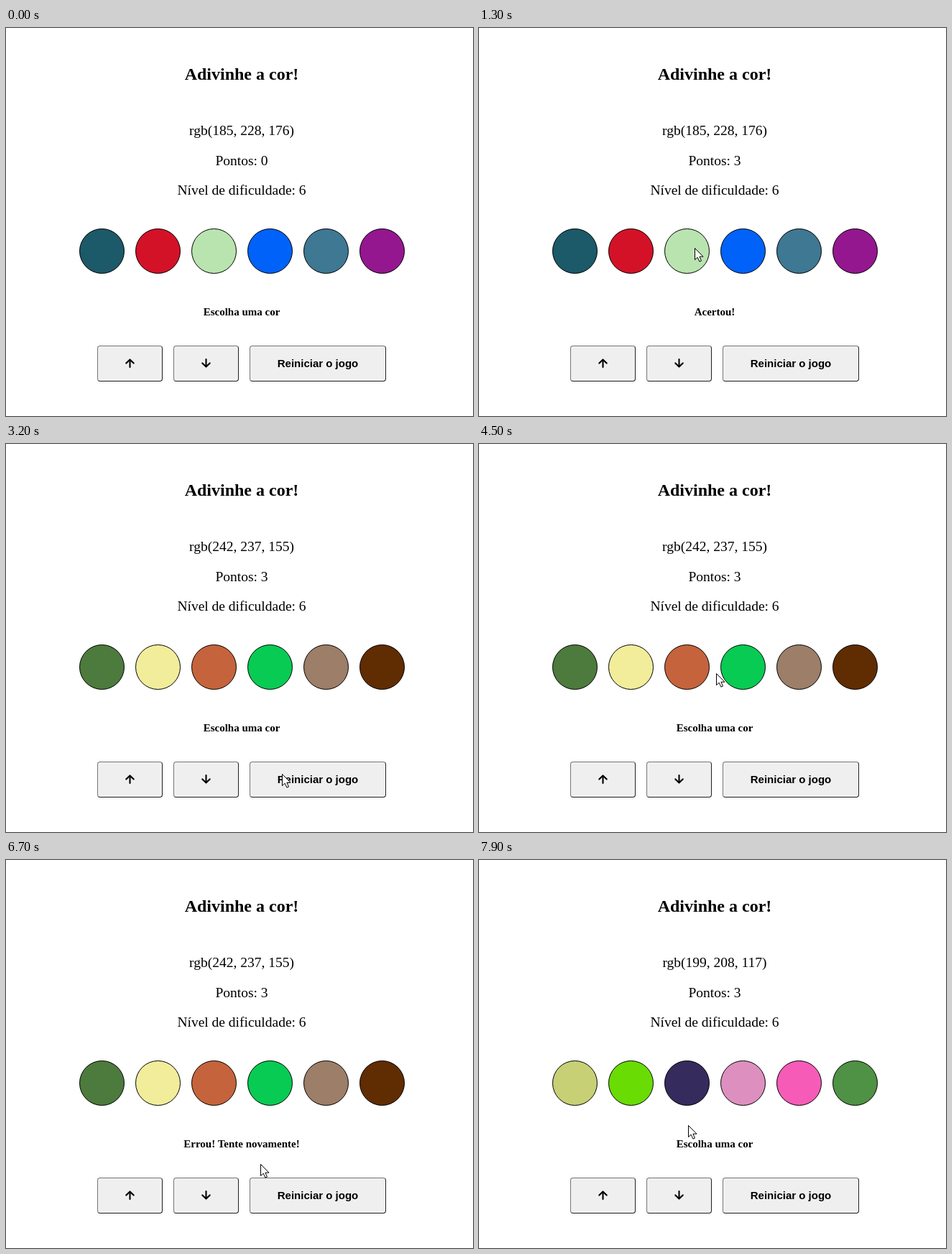
Recreate the animation shown at these times as an HTML page. Size 650x540 px, loop 8000 ms.

```html
<!DOCTYPE html>
<html lang="pt">
<head>
<meta charset="utf-8">
<title>Adivinhe a cor!</title>
<style>
html, body { margin: 0; width: 100%; height: 100%; overflow: hidden; background: #fff; }
#stage { position: relative; width: 650px; height: 540px; overflow: hidden; color: #000;
  font: 19.5px/21px "Liberation Serif", "Times New Roman", serif; }
#stage > * { position: absolute; margin: 0; box-sizing: border-box; }
p { left: 0; width: 656px; text-align: center; white-space: nowrap; }
.title { top: 51px; font-weight: bold; font-size: 24px; line-height: 26px; }
#code { top: 132px; }
#points { top: 174px; }
.level { top: 215px; }
#message { top: 387px; font-weight: bold; font-size: 15px; line-height: 16px; }
.ball { top: 279px; width: 63px; height: 63px; border: 1px solid #000; border-radius: 50%; }
.button { top: 442px; width: 91px; height: 50px; border: 1px outset #767676; border-radius: 4px;
  background: #efefef; text-align: center; font: bold 15px/47px "Liberation Sans", Arial, sans-serif; }
.button.pressed { border-style: inset; }
svg { left: 0; top: 0; }
</style>
</head>
<body>
<div id="stage">
  <p class="title">Adivinhe a cor!</p>
  <p id="code"></p>
  <p id="points"></p>
  <p class="level">Nível de dificuldade: 6</p>
  <p id="message"></p>
  <div class="button" style="left:127px"></div>
  <div class="button" style="left:233px"></div>
  <div class="button" id="restart" style="left:339px;width:190px">Reiniciar o jogo</div>
  <svg width="650" height="540">
    <path d="M172.5 461.5V472M167.3 466.6l5.2-5.2 5.2 5.2M278.5 461V471.5M273.3 466.4l5.2 5.2 5.2-5.2"
      fill="none" stroke="#000" stroke-width="2.1" stroke-linecap="round" stroke-linejoin="round"/>
    <path id="cursor" d="M.5.5V16.6L4.2 13.2 6.9 19.1 9.5 18 6.9 12.2H12Z" fill="#fff" stroke="#000"/>
  </svg>
</div>
<script>
const $ = id => document.getElementById(id);
const stage = $('stage');

// Start time of each round, colour to guess, ball colours
const rounds = [
  [0, 'rgb(185, 228, 176)', ['#1c5969', '#d41227', '#b9e4b0', '#0062f8', '#3e7892', '#94178f']],
  [3200, 'rgb(242, 237, 155)', ['#4d7a3d', '#f2ed9b', '#c5633c', '#08cb53', '#9c7e69', '#602c02']],
  [7700, 'rgb(199, 208, 117)', ['#c7d075', '#69dc04', '#362b5d', '#dd90bf', '#f65cb7', '#4f9145']]
];
const messages = [[0, 'Escolha uma cor'], [1300, 'Acertou!'], [3200, 'Escolha uma cor'],
  [5600, 'Errou! Tente novamente!'], [7700, 'Escolha uma cor']];

// Pointer path: time, x, y
const path = [
  [200, 541, 340], [500, 350, 325], [700, 258, 315], [900, 300, 306], [2000, 300, 306],
  [2400, 352, 442], [2500, 352, 442], [2600, 391, 448], [2700, 384, 459], [3300, 384, 459],
  [3400, 391, 448], [3700, 363, 319], [3800, 363, 319], [3900, 365, 325], [4300, 329, 322],
  [4400, 329, 322], [4500, 330, 319], [4800, 400, 311], [5000, 453, 317], [5100, 453, 317],
  [5300, 504, 309], [6200, 504, 309], [6700, 354, 423], [6800, 349, 438], [7100, 372, 468],
  [7700, 372, 468], [7900, 291, 369], [8000, 291, 369]
];

const balls = rounds[0][2].map((_, i) => {
  const ball = document.createElement('div');
  ball.className = 'ball';
  ball.style.left = 102 + 78 * i + 'px';
  stage.insertBefore(ball, stage.querySelector('svg'));
  return ball;
});

const current = (list, t) => list.filter(item => item[0] <= t).pop();

function pointerAt(t) {
  const next = path.findIndex(p => p[0] > t);
  const [t0, x0, y0] = path[next - 1], [t1, x1, y1] = path[next];
  const k = (t - t0) / (t1 - t0);
  return [x0 + (x1 - x0) * k, y0 + (y1 - y0) * k].map(Math.round);
}

function draw(now) {
  const t = Math.floor(now % 8000 / 100) * 100;
  const [, code, colors] = current(rounds, t);
  $('code').textContent = code;
  $('points').textContent = 'Pontos: ' + (t < 1300 ? 0 : 3);
  $('message').textContent = current(messages, t)[1];
  balls.forEach((ball, i) => ball.style.background = colors[i]);
  $('restart').classList.toggle('pressed', t === 3100 || t === 7600);
  $('cursor').style.display = t < 200 ? 'none' : '';
  if (t >= 200) $('cursor').setAttribute('transform', `translate(${pointerAt(t)})`);
}

const start = performance.now();
function tick() {
  draw(performance.now() - start);
  requestAnimationFrame(tick);
}
tick();
</script>
</body>
</html>
```
